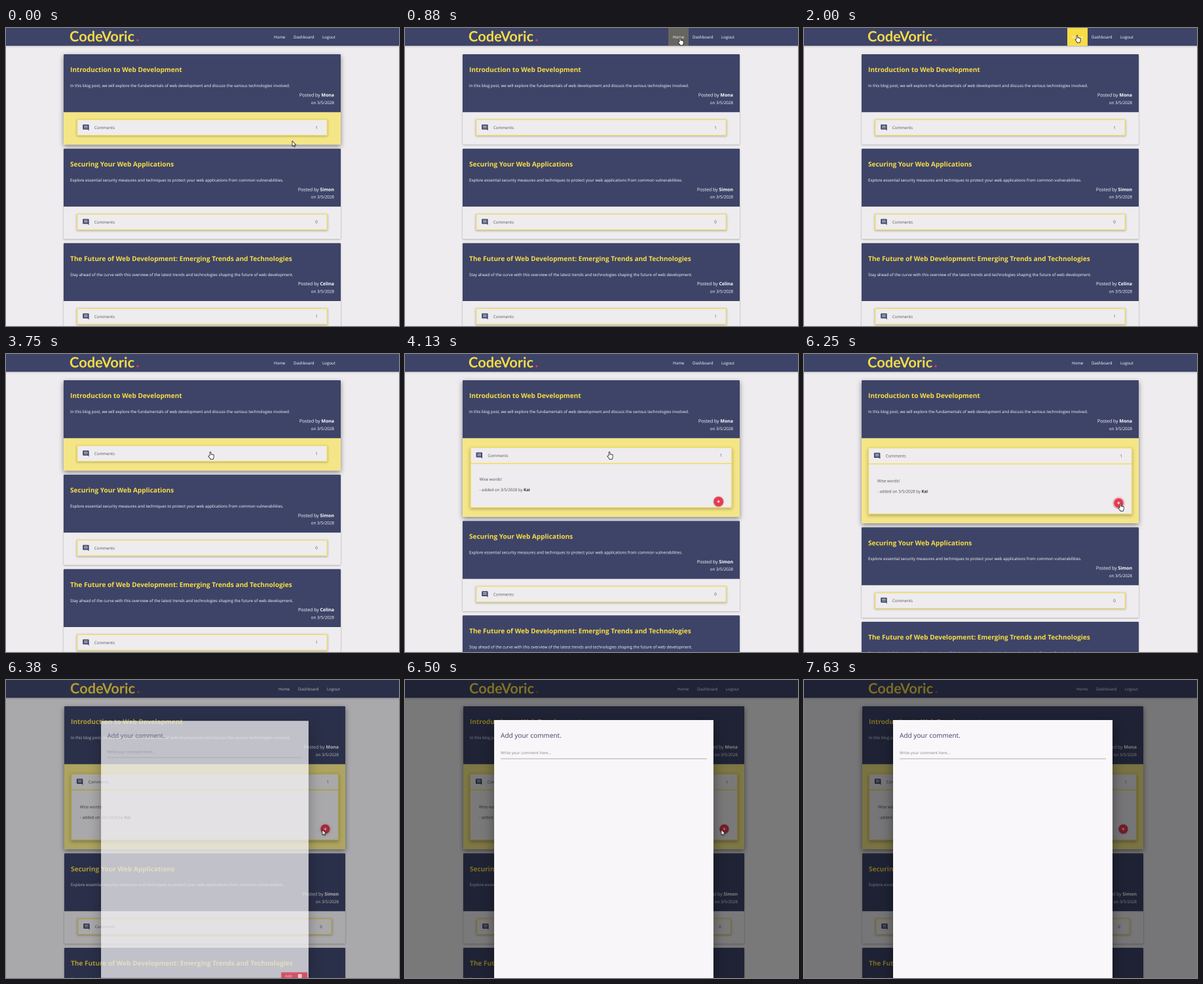
Animation, 600 px wide and 454 px high, one loop 8 s. Source, as an HTML page with a canvas:

```html
<!DOCTYPE html>
<html lang="en">
<head>
<meta charset="utf-8">
<title>Blog comments</title>
<style>
  html, body { margin: 0; width: 100%; height: 100%; overflow: hidden; background: #eeecef; }
  canvas { display: block; width: 600px; height: 454px; }
</style>
</head>
<body>
<canvas id="stage"></canvas>
<script>
const W = 600, H = 454, LOOP = 8000, STEP = 125;
const NAVY = '#3d4468', PAPER = '#eeecef', GOLD = '#f8dc45', RED = '#e8384f';
const SANS = '"Open Sans", "Noto Sans", sans-serif';
const SMALL = 6.12;

const canvas = document.getElementById('stage');
const ctx = canvas.getContext('2d');
// Twice the resolution keeps the tiny text smooth.
const scale = 2 * (window.devicePixelRatio || 1);
canvas.width = W * scale;
canvas.height = H * scale;
ctx.textRendering = 'geometricPrecision';

const POSTS = [
  { title: 'Introduction to Web Development', author: 'Mona', count: 1,
    text: 'In this blog post, we will explore the fundamentals of web development and discuss the various technologies involved.' },
  { title: 'Securing Your Web Applications', author: 'Simon', count: 0,
    text: 'Explore essential security measures and techniques to protect your web applications from common vulnerabilities.' },
  { title: 'The Future of Web Development: Emerging Trends and Technologies', author: 'Celina', count: 1,
    text: 'Stay ahead of the curve with this overview of the latest trends and technologies shaping the future of web development.' }
];

// Pointer path: time, x, y
const PATH = [
  [0, 437, 172], [130, 437, 172], [380, 434, 120], [625, 428, 38], [875, 420, 15],
  [1250, 417, 12], [2000, 417, 11], [2500, 417, 11], [2650, 412, 23], [2800, 395, 45],
  [3000, 360, 100], [3250, 325, 140], [3625, 312, 149], [4880, 312, 149],
  [5250, 306.5, 158], [5500, 315, 163], [6000, 470, 216], [6200, 483, 228],
  [6625, 483, 228], [7000, 560, 262], [7375, 612, 290], [LOOP, 612, 290]
];
const HOME_ON = 820, HOME_OFF = 2660;
const CARD_OFF = 620, CARD_ON = 2800;
const EXPAND = 3918, MODAL = 6287, PULSE = 3960;

const ARROW = new Path2D('M0 0V8.3L1.9 6.6 3.1 9.3 4.5 8.7 3.3 6.1H5.8Z');
const HAND = new Path2D('M-.9 6V.9A.9 .9 0 0 1 .9 .9V4A.8 .8 0 0 1 2.4 4.3 .8 .8 0 0 1 3.9 4.7 .7 .7 0 0 1 5.2 5.3V8Q5.2 9.3 4.4 10.2V11.3H-.1V10.4L-2.9 7.2Q-3.2 6.1-2.1 6Z');

const clamp = v => Math.max(0, Math.min(1, v));
const ramp = (t, start, length) => clamp((t - start) / length);
const mix = (a, b, p) => a + (b - a) * p;
const outQuad = p => 1 - (1 - p) ** 2;
const outCubic = p => 1 - (1 - p) ** 3;
const inOutCubic = p => p < .5 ? 4 * p ** 3 : 1 - (2 - 2 * p) ** 3 / 2;

function pointerAt(t) {
  const i = PATH.findIndex(k => k[0] > t);
  const [t0, x0, y0] = PATH[i - 1], [t1, x1, y1] = PATH[i];
  const p = (t - t0) / (t1 - t0);
  return { x: mix(x0, x1, p), y: mix(y0, y1, p) };
}

function rect(x0, y0, x1, y1, fill) {
  ctx.fillStyle = fill;
  ctx.fillRect(x0, y0, x1 - x0, y1 - y0);
}

function circle(x, y, r, fill) {
  ctx.fillStyle = fill;
  ctx.beginPath();
  ctx.arc(x, y, r, 0, 7);
  ctx.fill();
}

function label(str, x, y, size, color, weight = 400, align = 'left', family = SANS) {
  ctx.font = `${weight} ${size}px ${family}`;
  ctx.fillStyle = color;
  ctx.textAlign = align;
  ctx.fillText(str, x, y);
  return ctx.measureText(str).width;
}

function shadowed(dy, blur, alpha, draw) {
  ctx.save();
  ctx.shadowColor = `rgba(0,0,0,${alpha})`;
  ctx.shadowOffsetY = dy * scale;
  ctx.shadowBlur = blur * scale;
  draw();
  ctx.restore();
}

function drawNav(right, left, home) {
  shadowed(.8, 2.5, .32, () => rect(-5, -5, W + 10, 27, NAVY));
  label('CodeVoric', left + 9, 20.3, 21.8, GOLD, 700, 'left', 'Lato, sans-serif');
  circle(left + 113, 18.6, 1.6, RED);
  ctx.globalAlpha = home;
  rect(right - 109, 0, right - 78, 27, GOLD);
  ctx.globalAlpha = 1;
  label('Home', right - 102, 16, SMALL, '#fff');
  label('Dashboard', right - 72, 16, SMALL, '#fff');
  label('Logout', right - 28, 16, SMALL, '#fff');
}

function drawBubble(x, y) {
  ctx.fillStyle = NAVY;
  ctx.beginPath();
  ctx.roundRect(x, y, 9.4, 7.6, 1);
  ctx.fill();
  ctx.beginPath();
  ctx.moveTo(x + 9.4, y + 5);
  ctx.lineTo(x + 9.4, y + 9.4);
  ctx.lineTo(x + 7, y + 7);
  ctx.fill();
  for (let i = 0; i < 3; i++) rect(x + 1.8, y + 1.6 + i * 1.6, x + 7.6, y + 2.3 + i * 1.6, PAPER);
}

function drawPulse(x, y, t) {
  const p = clamp(((t - PULSE) % 1000) / 500);
  const e = p * p * (3 - 2 * p);
  ctx.globalAlpha = (1 - e) * .6;
  circle(x, y, 7.2 * (1 + e * .5), RED);
  ctx.globalAlpha = 1;
  shadowed(.8, 2, .3, () => circle(x, y, 7, RED));
  rect(x - 2.3, y - .5, x + 2.3, y + .5, '#fff');
  rect(x - .5, y - 2.3, x + .5, y + 2.3, '#fff');
}

function drawComments(x0, x1, y0, y1, count, open, t) {
  shadowed(mix(.9, 2, open), mix(3, 5, open), .3, () => rect(x0, y0, x1, y1, PAPER));
  if (open > 0) {
    ctx.save();
    ctx.beginPath();
    ctx.rect(x0, y0, x1 - x0, y1 - y0);
    ctx.clip();
    const top = y0 + 25 + 14 * open;
    const w = label('- added on 3/5/2028 by ', x0 + 14, top + 30, SMALL, '#4c4b52');
    label('Wise words!', x0 + 14, top + 13.8, SMALL, '#4c4b52');
    label('Kai', x0 + 14 + w, top + 30, SMALL, '#2b2b35', 700);
    rect(x0, y0 + 24.2, x1, y0 + 25.6, GOLD);
    ctx.restore();
  }
  ctx.strokeStyle = '#f2db55';
  ctx.lineWidth = 1.2;
  ctx.strokeRect(x0 + .6, y0 + .6, x1 - x0 - 1.2, y1 - y0 - 1.2);
  drawBubble(x0 + 9, y0 + 8);
  label('Comments', x0 + 26.7, y0 + 15, SMALL, '#55545a');
  label(count, x1 - 16.8, y0 + 14.8, SMALL, '#55545a', 400, 'center');
  if (open > .5) drawPulse(x1 - 20.7, y0 + 70.5 + 14 * open, t);
}

function drawCard(post, y, left, right, hover, open, margin, t) {
  const grow = 3.5 * margin + 76.7 * open;
  const bottom = y + 137.6 + grow;
  shadowed(mix(.7, 2.6, hover), mix(2, 7.5, hover), mix(.34, .46, hover), () => {
    ctx.fillStyle = PAPER;
    ctx.beginPath();
    ctx.roundRect(left, y, right - left, bottom - y, 1);
    ctx.fill();
  });
  ctx.globalAlpha = hover;
  rect(left, y + 88, right, bottom, '#f4e687');
  ctx.globalAlpha = 1;
  ctx.fillStyle = NAVY;
  ctx.beginPath();
  ctx.roundRect(left, y, right - left, 88.2, [1, 1, 0, 0]);
  ctx.fill();

  label(post.title, left + 10, y + 27.2, 10.06, GOLD, 700);
  label(post.text, left + 10, y + 50, SMALL, '#fff');
  const w = label(post.author, right - 10, y + 64.4, 6.95, '#fff', 700, 'right');
  label('Posted by ', right - 10 - w, y + 64.4, 6.95, '#fff', 400, 'right');
  label('on 3/5/2028', right - 10, y + 75.8, 6.25, '#fff', 400, 'right');

  const inset = 20.2 - 10.3 * margin;
  drawComments(left + inset, right - inset, y + 99 + 3.5 * margin, bottom - 13.5, post.count, open, t);
  return bottom + 6.3;
}

function drawModal(p) {
  const e = outCubic(p), s = mix(.8, 1, e);
  const w = 335, h = 414, top = mix(24.4, 61, e);
  ctx.globalAlpha = .5 * outQuad(p);
  rect(0, 0, W, H, '#000');
  ctx.globalAlpha = e;
  ctx.save();
  ctx.translate(303.5, top + h / 2);
  ctx.scale(s, s);
  ctx.translate(-w / 2, -h / 2);

  // Keep the shadow outside the translucent sheet.
  ctx.save();
  ctx.beginPath();
  ctx.rect(-W, -H, 3 * W, 3 * H);
  ctx.rect(0, 0, w, h);
  ctx.clip('evenodd');
  shadowed(8, 18, .4, () => rect(0, 0, w, h, '#f9f7f9'));
  ctx.restore();
  rect(0, 0, w, h, '#f9f7f9');

  label('Add your comment.', 10, 27, 10.05, NAVY);
  label('Write your comment here...', 10, 52, 6.05, '#88868a');
  rect(10, 58.6, 325, 59.4, '#9b999d');
  shadowed(1, 2, .3, () => rect(291, 405, 333, 414, RED));
  label('Add', 297, 413, SMALL, '#fff');
  rect(318, 408, 324, 414, '#fff');
  ctx.restore();
  ctx.globalAlpha = 1;
}

function drawPointer(t) {
  const { x, y } = pointerAt(t);
  const onHome = y < 27 && x > 402 && x < 433;
  const onHeader = y > 139 && y < 167 && x < 430 && t > 3000;
  const onButton = t > 6100 && t < MODAL;
  ctx.save();
  ctx.translate(x, y);
  const shape = onHome || onHeader || onButton ? HAND : ARROW;
  ctx.fillStyle = '#fff';
  ctx.strokeStyle = '#222';
  ctx.lineWidth = .8;
  ctx.lineJoin = 'round';
  ctx.fill(shape);
  ctx.stroke(shape);
  ctx.restore();
}

function draw(t) {
  const modal = ramp(t, MODAL, 250);
  const left = modal ? 89 : 88, right = modal ? 518 : 511;
  const home = ramp(t, HOME_ON, 250) - ramp(t, HOME_OFF, 250);
  const hover = 1 - ramp(t, CARD_OFF, 200) + ramp(t, CARD_ON, 250);
  const open = inOutCubic(ramp(t, EXPAND, 300));
  const margin = outQuad(ramp(t, EXPAND, 350));

  ctx.setTransform(scale, 0, 0, scale, 0, 0);
  rect(0, 0, W, H, PAPER);
  drawNav(right, left, home);
  let y = 40;
  POSTS.forEach((post, i) => {
    const on = i === 0 ? 1 : 0;
    y = drawCard(post, y, left, right, hover * on, open * on, margin * on, t);
  });
  if (modal) drawModal(modal);
  drawPointer(t);
}

function tick(now) {
  // The screen refreshes eight times a second.
  draw(Math.floor((now % LOOP) / STEP) * STEP);
  requestAnimationFrame(tick);
}
requestAnimationFrame(tick);
</script>
</body>
</html>
```
